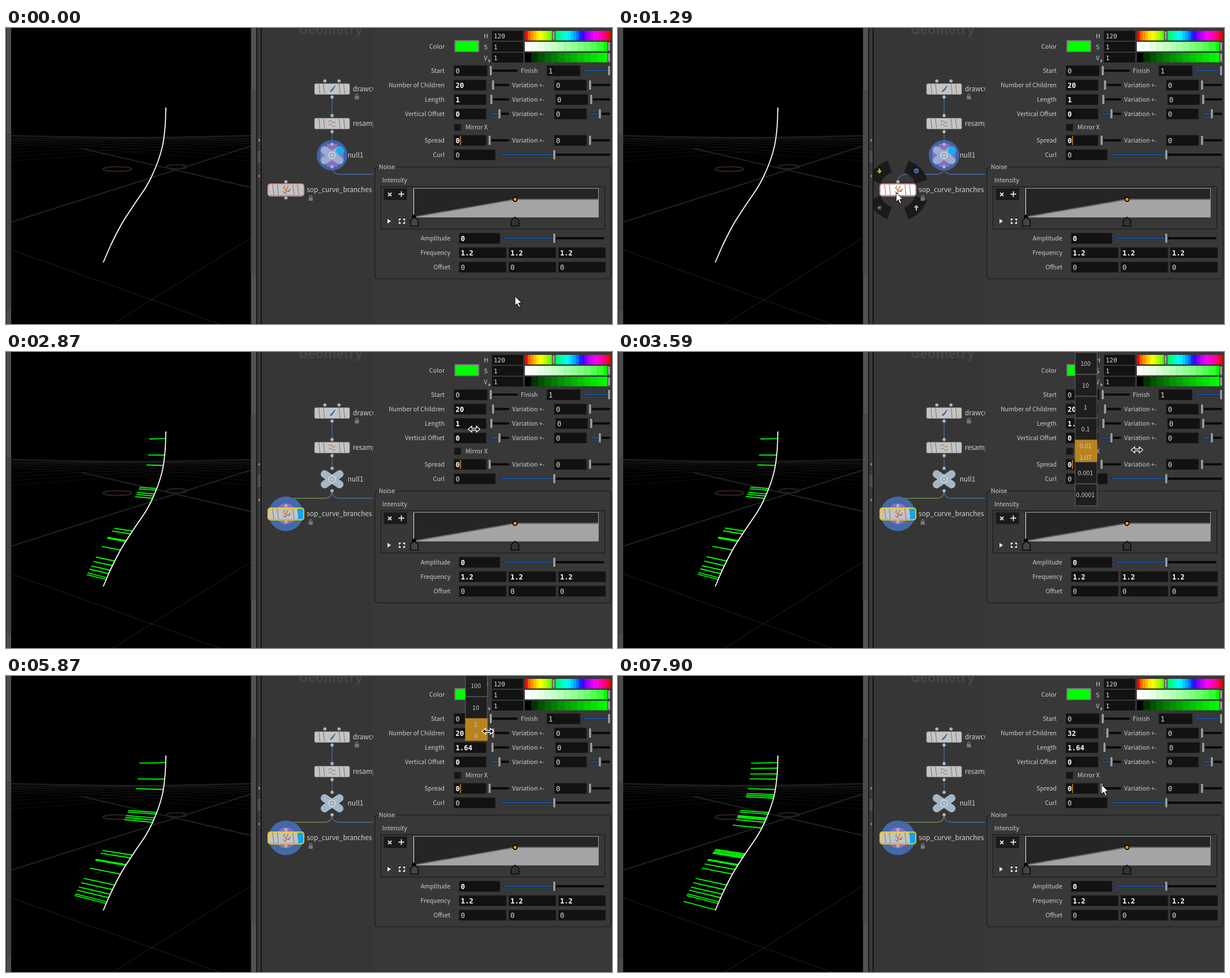
Write an HTML page that moves like this. It is 1050x514 px and loops after 8 s.

```html
<!DOCTYPE html>
<html lang="en">
<head>
<meta charset="utf-8">
<title>Curve branches</title>
<style>
  html, body { margin: 0; width: 100%; height: 100%; overflow: hidden; background: #363636; }
  svg { display: block; width: 1050px; height: 514px; }
  text { font-family: "Noto Sans CJK JP", "Noto Sans CJK SC", "Noto Sans CJK", "Open Sans", sans-serif; font-size: 10.6px; fill: #ccc; white-space: pre; }
  .node { font-size: 11.65px; fill: #d2d2d2; }
  .num { font-family: "DejaVu Sans Mono", "Liberation Mono", monospace; font-size: 12px; fill: #ddd; }
  .hsv { font-size: 11px; }
  .bold { font-weight: bold; fill: #fff; }
  .end { text-anchor: end; }
  .mid { text-anchor: middle; }
  .title { font-size: 22.6px; font-weight: bold; fill: #474747; }
  .wire { fill: none; stroke: #4a6fa5; stroke-width: 1.3; }
</style>
</head>
<body>
<svg viewBox="0 0 1050 514">
  <defs>
    <linearGradient id="knob"><stop stop-color="#777"/><stop offset=".5" stop-color="#aaa"/><stop offset="1" stop-color="#666"/></linearGradient>
    <clipPath id="view"><path d="M9 0H425V514H9Z"/></clipPath>
    <clipPath id="net"><path d="M443 0H636V514H443Z"/></clipPath>
  </defs>
  <rect width="1050" height="514" fill="#363636"/>
  <path d="M9 0H425V514H9Z"/>
  <g clip-path="url(#view)" fill="none">
    <g id="grid"></g>
    <ellipse cx="193" cy="245" rx="25" ry="4" stroke="#2b1c1a" stroke-width="2.5"/>
    <ellipse cx="296" cy="241" rx="18" ry="3.5" stroke="#1d1e28" stroke-width="2.5"/>
    <g id="branches" stroke="#0f0" stroke-width="1.8"></g>
    <path id="stem" stroke="#fff" stroke-width="1.8"/>
  </g>
  <g id="frame"></g>
  <g clip-path="url(#net)">
    <text class="title" x="507" y="11">Geometry</text>
    <g id="nodes"></g>
  </g>
  <g id="params"></g>
  <g id="live"></g>
  <g id="ladder"></g>
  <g id="pointer"></g>
</svg>
<script>
const $ = id => document.getElementById(id);
const rect = (x, y, w, h, fill, more = '') => `<rect x="${x}" y="${y}" width="${w}" height="${h}" fill="${fill}" ${more}/>`;
const path = (d, more = '') => `<path d="${d}" ${more}/>`;
const dot = (x, y, r, fill, more = '') => `<circle cx="${x}" cy="${y}" r="${r}" fill="${fill}" ${more}/>`;
const text = (x, y, s, cls = '') => `<text x="${x}" y="${y}" class="${cls}">${s}</text>`;
const line = (x1, y1, x2, y2, col, w = 1) => path(`M${x1} ${y1}L${x2} ${y2}`, `fill="none" stroke="${col}" stroke-width="${w}"`);

// Viewport
const stemX = [277, 275.6, 271, 260.5, 244.6, 222.3, 200.8, 183.3, 168.5];
function curveX(y) {
  const u = Math.min(7.999, Math.max(0, (y - 138) / 269 * 8)), i = Math.floor(u), f = u - i;
  const b = stemX[i], c = stemX[i + 1];
  const a = stemX[i - 1] ?? 2 * b - c, d = stemX[i + 2] ?? 2 * c - b;
  return b + f / 2 * (c - a + f * (2 * a - 5 * b + 4 * c - d + f * (3 * (b - c) + d - a)));
}
function drawStem() {
  let d = '';
  for (let y = 138; y <= 407; y += 3) d += `${d ? 'L' : 'M'}${curveX(y).toFixed(1)} ${y}`;
  $('stem').setAttribute('d', d + 'L168.5 407');
}
function drawGrid() {
  let s = '';
  for (let i = 0; i < 9; i++) {
    const y = 190 + i * i * .4, k = .01 + i * .008, c = `rgba(70,70,70,${.3 - i * .012})`;
    s += line(9, y + 208 * k, 425, y - 208 * k, c) + line(9, y - 208 * k, 425, y + 208 * k, c);
  }
  s += line(9, 337, 425, 205, '#222', 2) + line(130, 209, 425, 277, '#222', 2);
  s += line(9, 385, 370, 514, '#222') + line(185, 514, 425, 364, '#222');
  $('grid').innerHTML = s;
}
const bases = [150.3, 179, 197, 237, 240, 246.5, 250, 254, 311, 316, 327.5, 328, 329, 344, 363, 371, 379, 385, 392, 395,
  264, 406, 160, 209, 309, 336, 206, 313, 170, 315, 212, 248];
function branches(count, len) {
  return bases.slice(0, count).map(y => {
    const x = curveX(y), w = (28 + (y - 150) / 44) * len;
    return path(`M${x.toFixed(1)} ${y}l${-w.toFixed(1)} ${(w * (172 - y) / 890).toFixed(1)}`);
  }).join('');
}

// Pane borders
function drawFrame() {
  let s = rect(0, 0, 9, 514, '#4c4c4c') + rect(0, 183, 9, 307, '#444') + rect(0, 0, 1, 514, '#222');
  s += rect(424.5, 0, 9, 514, '#525252') + rect(424.5, 108, 9, 322, '#4a4a4a');
  s += rect(433.5, 0, 2, 514, '#151515') + rect(435.5, 0, 5.5, 514, '#3a3a3a') + rect(441, 0, 2, 514, '#151515');
  for (let i = 0; i < 14; i++) s += rect(436 + i % 2 * 3, 214 + (i >> 1) * 3, 1.6, 1.6, '#777');
  for (const y of [195, 257]) s += path(`M440 ${y - 3}V${y + 3}L436.5 ${y}Z`, 'fill="#888"');
  $('frame').innerHTML = s;
}

// Network
const port = (x, y) => dot(x, y, 2.8, '#b4b4b4');
function box(x, y, fill) {
  let s = rect(x - 30.5, y - 9.5, 61, 19, fill, 'rx="2.5" stroke="#777" stroke-width=".6"');
  for (const d of [-22, -14, 13, 21]) s += line(x + d - 1, y - 9, x + d + 1, y + 9, '#777');
  return s;
}
const lock = (x, y) => rect(x - 3.5, y - 1, 7, 6, '#777') + path(`M${x - 2} ${y}v-2a2 2 0 0 1 4 0v2`, 'fill="none" stroke="#777" stroke-width="1.3"');
function nullNode(shown) {
  let s = '';
  if (shown) {
    s += dot(565, 221, 26.5, '#4263a4');
    s += path('M565 201V241M545 221H585', 'stroke="#8670c0" stroke-width="19" fill="none"');
  }
  s += path('M552 212L578 230M578 212L552 230', `stroke="${shown ? '#9aadd0' : '#a4b7c6'}" stroke-width="13.5" stroke-linecap="round" fill="none"`);
  if (shown) s += dot(579, 213, 7, '#12adf2');
  s += dot(565, 221, 5.5, '#8fa0b4', 'stroke="#dde4ea" stroke-width="1.4"') + dot(565, 221, 2.6, '#bcc8d2');
  return s + port(565, 202) + port(565, 241) + text(592, 225, 'null1', 'node');
}
function radial() {
  const stroke = 'fill="none" stroke-width="2.4"';
  return dot(485, 281, 43, 'none', 'stroke="#1a1a1a" stroke-width="22" stroke-dasharray="38 29.54" stroke-dashoffset="-14.8"')
    + path('M453 244v7m-3-3l3 3 3-3', `stroke="#dfab28" ${stroke}`)
    + dot(517, 248, 3.4, '#234b83', 'stroke="#4f83c4" stroke-width="1.6"')
    + path('M449 312h8M451 308.500l4 7M455 308.500l-4 7', 'stroke="#8ea7b7" fill="none"')
    + path('M517 317v-8m-3 3l3-3 3 3', `stroke="#ca9bd0" ${stroke}`);
}
function nodes(n, px, py) {
  const linked = n >= 9, shown = n >= 13, hover = n >= 9 && n < 18;
  let s = path('M565 115V157M565 175V202', 'class="wire"');
  s += path('M565 241Q565 254 579 254H637', 'class="wire"');
  if (linked) s += path('M565 241Q565 254 551 254H501Q485 254 485 267', `class="wire" ${shown ? 'style="stroke:#708a50"' : ''}`);
  else if (n >= 6) s += path(`M565 241Q565 254 551 254L${px} ${py}`, 'class="wire"');
  s += box(565, 106, '#c4c4c4') + path('M560 112q2-6 4-6l6-7 2 1-5 8q-2 4-7 4', 'fill="#456b90" stroke="#eee" stroke-width=".7"');
  s += port(552.5, 92) + port(577, 92) + port(565, 120) + text(601, 110, 'drawcurve', 'node') + lock(608, 119);
  s += box(565, 166, '#c4c4c4');
  for (const y of [163, 169]) s += path(`M559 ${y}q3-4 6 0t6 0`, 'fill="none" stroke="#a0786e" stroke-width="1.1"');
  s += port(565, 152) + port(565, 180) + text(601, 170, 'resample', 'node');
  s += nullNode(!shown);
  if (n >= 9 && n < 13) s += radial();
  if (shown) s += dot(485, 281, 30, '#4469a8') + dot(485, 281, 18, '#8b70c0');
  s += port(485, 267) + port(485, 295) + box(485, 281, hover ? '#fff' : '#c4c4c4');
  if (shown) s += rect(506, 272, 9, 18.500, '#12a5ea');
  s += path('M485 288v-6l-5-5m5 5l4-8m-4 9h5l3-4', 'fill="none" stroke="#cc7238" stroke-width="1.5"')
    + path('M480 284l4 3m4-3l4-1m-9-6l-1-3', 'fill="none" stroke="#5b7896" stroke-width="1.3"');
  s += rect(454, 271, 62, 20.500, 'none', `rx="4" stroke="${shown ? '#f2cb18' : '#d89a9a'}" stroke-width="1.8"`);
  return s + text(521, 285, 'sop_curve_branches', 'node') + lock(528, 295);
}

// Parameters
const field = (x, y, w, v, cls = '') => rect(x, y, w, 18.500, '#121212', 'stroke="#2a2a2a" stroke-width=".8"') + (v === '' ? '' : text(x + 3, y + 13.500, v, 'num ' + cls));
const knob = (x, y, h = 17) => rect(x - 2.5, y - h / 2, 5, h, 'url(#knob)', 'stroke="#222" stroke-width=".7"');
function slider(x1, x2, y, at, blue) {
  return rect(x1, y - 2, x2 - x1, 4, '#0b0b0b', 'rx="2"') + (blue ? rect(x1 + 1, y - 1.5, at - x1, 3, '#1f5499') : '') + knob(at, y);
}
const label = (y, s, x = 760) => text(x, y + 4, s, 'end');
function variation(y, x, at, blue) {
  return text(877, y + 4, 'Variation +-') + field(x, y - 9, 56, '0') + slider(at - (blue ? 17 : 2), 1047, y, at, blue);
}
// Display gamma brightens the mid tones of the colour bars.
const rgb = (...c) => `rgb(${c.map(v => Math.round(255 * Math.min(1, Math.max(0, v)) ** (1 / 1.6)))})`;
function bars() {
  const row = (y, count, colour) => {
    let s = '';
    for (let i = 0, w = 148 / count; i < count; i++) s += rect(899 + i * w, y, w + .4, 16.500, colour(i / (count - 1)));
    return s;
  };
  const hue = f => rgb(Math.abs(f * 6 - 3) - 1, 2 - Math.abs(f * 6 - 2), 2 - Math.abs(f * 6 - 4));
  return row(5, 30, hue) + row(24, 13, f => rgb(1 - f, 1, 1 - f)) + row(43, 13, f => rgb(0, f, 0))
    + knob(949, 13, 15) + knob(1045, 32, 15) + knob(1045, 51, 15);
}
function ramp() {
  const tab = (x, c) => path(`M${x - 6.500} 344V334L${x} 328.500L${x + 6.500} 334V344Z`, `fill="${c}" stroke="#080808" stroke-width="1.6"`);
  let s = rect(649.5, 275.5, 388, 73.500, '#373737', 'stroke="#171717"');
  for (const x of [655, 675]) s += rect(x, 279, 19.500, 19.500, '#1b1b1b', 'stroke="#1c1c1c"');
  s += path('M662 286l6 6m0-6l-6 6M680 288.500h10m-5-5v10', 'stroke="#ddd" stroke-width="1.8" fill="none"');
  s += rect(706.5, 278.5, 320, 50, '#252525', 'stroke="#999" stroke-width="1"');
  s += path('M707 328L882 297.500H1026V328Z', 'fill="#a4a4a4"') + path('M707 328L882 297.500H1026', 'fill="none" stroke="#666" stroke-width="2"');
  s += line(706.5, 279, 706.5, 328, '#eee') + dot(707, 327.5, 3.5, '#000') + dot(882, 297.5, 3.6, '#e29a20', 'stroke="#000" stroke-width="1.8"');
  s += tab(707.5, '#444') + tab(882, '#333');
  s += path('M661 331.500V339.500L667 335.500Z', 'fill="#eee"');
  return s + path('M684 332h-2.500v2.500m0 2v2.500h2.500m4-7h2.500v2.500m0 2v2.500h-2.500', 'fill="none" stroke="#eee" stroke-width="1.8"');
}
function drawParams() {
  let s = rect(636, 0, 414, 514, '#383838');
  s += label(32, 'Color') + rect(778, 22, 41, 19, '#0f0', 'stroke="#777" stroke-width="2" rx="1"');
  ['120', '1', '1'].forEach((v, i) => {
    const y = 5 + 19 * i;
    s += text(828, y + 13, 'HSV'[i]) + rect(842, y, 54, 17, '#121212') + text(845, y + 12.5, v, 'num hsv');
  });
  s += path('M836 54V60L840 57Z', 'fill="#999"') + bars();
  s += label(74, 'Start') + field(776, 65, 58, '0') + slider(840, 887, 74, 840) + text(892, 78, 'Finish') + field(937, 65, 58, '1') + slider(1000, 1047, 74, 1045, true);
  s += label(99, 'Number of Children') + variation(99, 950, 1012);
  s += label(124, 'Length') + variation(124, 952, 1014);
  s += label(149, 'Vertical Offset') + field(776, 140, 56, '0', 'bold') + slider(838, 872, 149, 855, true) + variation(149, 950, 1029, true);
  s += rect(776.5, 166.5, 12, 12, '#161616', 'stroke="#2a2a2a"') + text(796, 176, 'Mirror X');
  s += label(195, 'Spread') + field(776, 186, 56, '0', 'bold') + line(787.5, 187.5, 787.5, 203, '#d18f20', 1.6) + slider(836, 872, 195, 838) + variation(195, 950, 1012);
  s += label(220, 'Curl') + field(776, 211, 72, '0') + slider(854, 1047, 220, 950, true);
  s += rect(639, 241.5, 409, 194, 'none', 'rx="5" stroke="#191919" stroke-width="1.2"') + rect(644, 236, 32, 10, '#383838');
  s += text(646, 245, 'Noise') + text(652, 268, 'Intensity') + ramp();
  s += label(365, 'Amplitude', 770) + field(785, 356, 71, '0', 'bold') + slider(862, 1037, 365, 950, true);
  s += label(390, 'Frequency', 770) + label(415, 'Offset', 770);
  for (const x of [785, 871, 957]) s += field(x, 381, 82, '1.2', 'bold') + field(x, 406, 82, '0');
  $('params').innerHTML = s;
}
function live(count, len) {
  const at = 844 + (count - 20) / 3;
  return field(776, 90, 56, count, 'bold') + slider(838, 872, 99, at, true)
    + field(776, 115, 56, +len.toFixed(2), 'bold') + slider(840, 872, 124, 841 + (len - 1) * 3);
}
function ladder(x, top, steps, pick, value) {
  return steps.map((step, i) => {
    const y = top + i * 38, on = i === pick;
    return rect(x, y, 38, 38, on ? '#b9841f' : '#1f1f1f', `stroke="${on ? '#b9841f' : '#666'}"`)
      + text(x + 18, y + (on ? 14 : 23), step, 'mid') + (on ? text(x + 18, y + 34, value, 'mid') : '');
  }).join('');
}

// Pointer track: step, x, y
const track = [[0, 882, 466], [1, 850, 446], [5, 566, 243], [7, 522, 258], [9, 486, 269], [11, 482, 286], [12, 490, 287], [13, 510, 288],
  [17, 510, 288], [20, 640, 215], [23, 800, 138], [24, 811, 134], [26, 811, 170], [28, 830, 170], [31, 934, 170], [33, 1008, 170], [34, 1008, 170],
  [35, 809, 136], [38, 809, 136], [41, 840, 96], [43, 840, 90], [45, 815, 95], [48, 815, 95], [49, 835, 96], [50, 845, 96], [57, 937, 96],
  [58, 935, 99], [63, 855, 190], [64, 849, 194], [66, 838, 189]];
const lengths = [[0, 1], [28, 1], [31, 1.1], [33, 1.45], [34, 1.6], [35, 1.63], [36, 1.63], [37, 1.64]];
function sample(keys, n, col) {
  const i = keys.findIndex(k => k[0] > n);
  if (i < 0) return keys[keys.length - 1][col];
  const a = keys[i - 1], b = keys[i];
  return a[col] + (b[col] - a[col]) * (n - a[0]) / (b[0] - a[0]);
}
function pointer(n, x, y) {
  const drag = (n >= 24 && n < 35) || (n >= 45 && n < 58), beam = n >= 35 && n < 40;
  const d = drag ? 'M-10 0L-4-5V-1.500H4V-5L10 0L4 5V1.500H-4V5Z'
    : beam ? 'M-3-7H-1L0-6L1-7H3M0-6V6M-3 7H-1L0 6L1 7H3' : 'M0 0V16L3.700 12.500L6.500 19L9 18L6.300 11.500H11.500Z';
  const style = drag ? 'fill="#000" stroke="#fff" stroke-width="1.3"'
    : beam ? 'fill="none" stroke="#fff" stroke-width="1.2"' : 'fill="#fff" stroke="#000" stroke-width=".9"';
  return path(d, `${style} transform="translate(${x} ${y})"`);
}

const STEP = 119.4, LAST = 66;
let shownStep = -1;
function draw(now) {
  requestAnimationFrame(draw);
  const n = Math.min(LAST, Math.floor((now % 8000 + 25) / STEP));
  if (n === shownStep) return;
  shownStep = n;
  const x = sample(track, n, 1), y = sample(track, n, 2), len = sample(lengths, n, 1);
  const count = n < 50 ? 20 : Math.min(32, 21 + Math.floor((n - 50) * 11 / 7));
  $('branches').innerHTML = n >= 15 ? branches(count, len) : '';
  $('nodes').innerHTML = nodes(n, x, y);
  $('live').innerHTML = live(count, len);
  $('ladder').innerHTML = n >= 25 && n < 35 ? ladder(792, 1, ['100', '10', '1', '0.1', '0.01', '0.001', '0.0001'], n < 26 ? 3 : 4, n < 29 ? 0 : +len.toFixed(2))
    : n >= 46 && n < 59 ? ladder(796, -2, ['100', '10', '1'], 2, n < 50 ? 0 : count) : '';
  $('pointer').innerHTML = pointer(n, x, y);
}
drawStem();
drawGrid();
drawFrame();
drawParams();
draw(performance.now());
</script>
</body>
</html>
```
